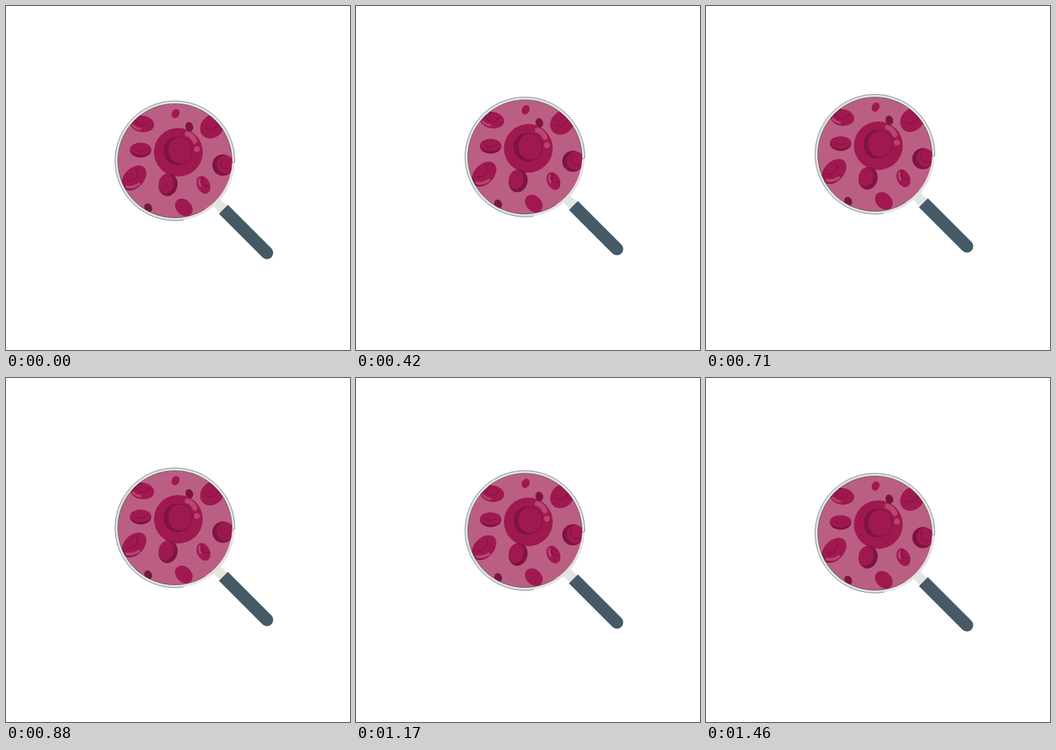
Recreate the animation shown at these times as an HTML page. Size 500x500 px, loop 1.5 s.

```html
<!DOCTYPE html>
<html lang="en">
<head>
<meta charset="utf-8">
<title>Cells under a magnifier</title>
<style>
  html, body { margin: 0; width: 100%; height: 100%; overflow: hidden; background: #fff; }
  svg { display: block; width: 100vw; height: 100vh; }
  .base { fill: #a01850; }
  .dark { fill: #7d143f; }
  .shine { fill: none; stroke: #b8466f; stroke-linecap: round; }
  .line { fill: none; stroke: #263238; stroke-width: .55; stroke-linecap: round; }
  .crease { fill: none; stroke: #5c1236; stroke-width: .7; stroke-linecap: round; }
</style>
</head>
<body>
<svg viewBox="0 0 500 500">
  <clipPath id="lens"><circle cx="245.5" cy="225.5" r="83"/></clipPath>
  <g id="magnifier">
    <path d="M300 280L318 298" stroke="#e4e5e1" stroke-width="14.5"/>
    <path d="M309.5 302.5L322.5 289.5L386 353A9.2 9.2 0 0 1 373 366Z" fill="#455a64"/>
    <circle cx="245.5" cy="225.5" r="87" fill="#e1e3e3"/>
    <circle cx="245.5" cy="225.5" r="83" fill="#ba5f83"/>
    <g id="cells" clip-path="url(#lens)"></g>
    <path class="line" d="M329 228Q331 228.500 332.500 227A87 87 0 1 0 258 311.600"/>
    <path class="line" d="M328.500 225.500A83 83 0 1 0 290 295.500"/>
  </g>
</svg>
<script>
const cells = document.getElementById("cells");
const magnifier = document.getElementById("magnifier");

function add(tag, attrs) {
  const node = document.createElementNS("http://www.w3.org/2000/svg", tag);
  for (const key in attrs) node.setAttribute(key, attrs[key]);
  cells.append(node);
}
const oval = (cls, cx, cy, rx, ry, turn = 0) =>
  add("ellipse", { class: cls, cx, cy, rx, ry, transform: `rotate(${turn} ${cx} ${cy})` });
const crease = d => add("path", { class: "crease", d });
const shine = (d, width) => add("path", { class: "shine", d, "stroke-width": width });

// Large central cell
oval("base", 250.5, 213, 35.5, 35.3);
oval("dark", 248, 211, 19, 20.7);
oval("base", 253.5, 210.5, 17.5, 19.3);
crease("M251 191.500C264 190 271 200 271 210C271 223 262 231 251 230");
shine("M263.500 186.500Q271 188.500 274.500 197", 7.5);
oval("base", 277.5, 208.5, 0, 0);
shine("M277.500 208.500h.01", 8.6);

// Small cells
oval("base", 246.5, 157, 5.5, 7, 25);
oval("dark", 266.5, 176, 5.5, 6.9, -18);
oval("dark", 206.7, 294, 5.5, 6.8, -25);
oval("base", 258.5, 293.3, 14.5, 11, 45);

// Upper left
oval("base", 198, 172, 17.5, 12, 8);
oval("dark", 189, 164, 9, 4, -25);
oval("base", 198, 168, 10, 6.5, 0);
crease("M189 168C191 176 206 177 207.500 167");
shine("M184.500 174Q188 178.500 195 179.500", 3.2);

// Middle left
oval("dark", 195.7, 210, 15.6, 10.6);
oval("base", 195.7, 208.3, 15.3, 8.9);
crease("M187.500 207.500C190 212.500 202 212.500 204.500 207.500");

// Lower left
oval("dark", 186, 250.7, 20.5, 14.2, -47);
oval("base", 187, 249.7, 20, 13.8, -47);
crease("M189 237C194 245 190 255 176 255");
shine("M175.500 263.500Q185 265 193 259.500", 4);

// Lower middle
oval("dark", 235.6, 260.3, 13.7, 16.7, 12);
oval("base", 233.6, 258.5, 11.5, 14.5, 12);
crease("M237 244.500C247 250 247 268 235 272");

// Lower right
oval("base", 287, 260.5, 9.4, 13.5, -25);
crease("M286 250C282 258 287 264 295.500 262");
shine("M281.500 252.500Q279.500 257 282.500 262", 3);

// Right
oval("dark", 315.3, 231.8, 15.5, 15.4);
oval("base", 319.5, 231, 13.5, 13, 25);
crease("M314 222C309 231 315 239 324 237");

// Upper right
oval("base", 300, 175.3, 19.5, 16, -45);
crease("M290 178C297 184 306 180 308 171");

// Steady 10px bob, stepped at 24 frames per second
function draw(now) {
  const step = Math.floor((now % 1500 + 4) * 0.024) % 36;
  const phase = (step + 1) % 36;
  const lift = 10 * (1 - Math.abs(phase / 18 - 1));
  magnifier.setAttribute("transform", `translate(0 ${-lift})`);
  requestAnimationFrame(draw);
}
draw(0);
</script>
</body>
</html>
```
